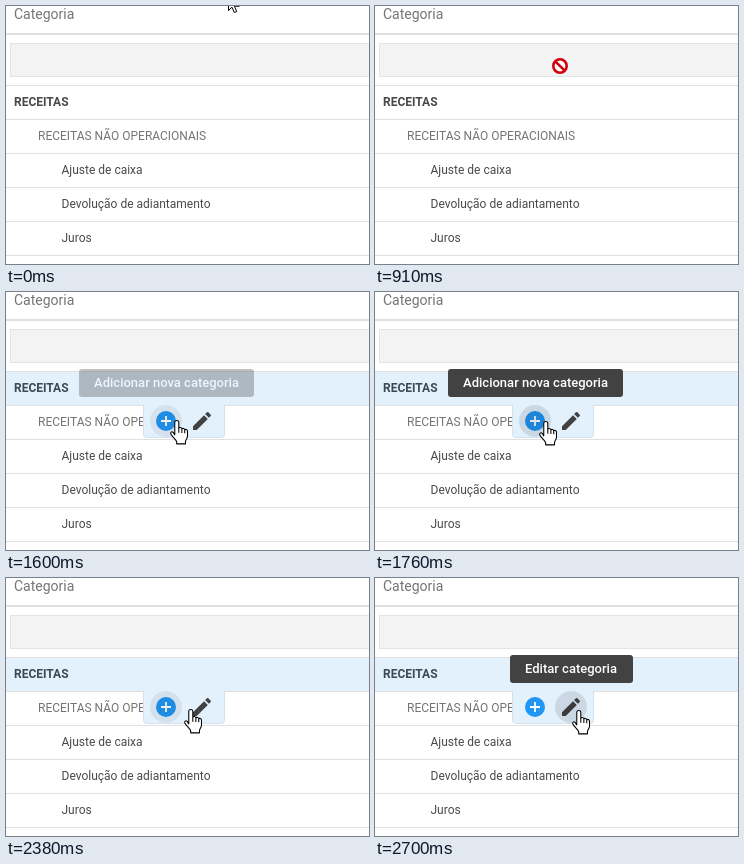
An HTML page for the animation above (4.17 s loop, 363 by 258 pixels).

```html
<!DOCTYPE html>
<html lang="pt">
<head>
<meta charset="utf-8">
<title>Categorias</title>
<style>
  html, body { margin: 0; width: 100%; height: 100%; overflow: hidden; background: #fff; }
  svg { display: block; width: 363px; height: 258px; }
  text { font: 400 12px Roboto, sans-serif; fill: #4a4a4a; white-space: pre; }
  .muted { fill: #757575; }
  .head { font-size: 14px; fill: #757575; }
  .group { font-weight: 700; }
  .tip text { font-size: 13px; font-weight: 500; fill: #fff; }
  .tip rect { fill: #424242; }
</style>
</head>
<body>
<svg viewBox="0 0 363 258">
  <rect width="363" height="258" fill="#fff"/>
  <text class="head" x="8" y="13">Categoria</text>
  <rect y="27" width="363" height="2" fill="#e0e0e0"/>
  <rect x="4.5" y="37.5" width="370" height="33" fill="#f3f3f3" stroke="#e4e4e4"/>
  <rect id="row" y="80" width="363" height="33" fill="#e3f1fd"/>
  <g id="lines" fill="#e0e0e0"></g>
  <text id="group" class="group" x="8" y="100">RECEITAS</text>
  <text class="muted" x="32" y="134">RECEITAS NÃO OPERACIONAIS</text>
  <text x="55.5" y="168">Ajuste de caixa</text>
  <text x="55.5" y="202">Devolução de adiantamento</text>
  <text x="55.5" y="236">Juros</text>

  <g id="menu">
    <path d="M137.5 113V142.5a3 3 0 0 0 3 3H215.5a3 3 0 0 0 3-3V113" fill="#e3f1fd" stroke="#d3e2ef"/>
    <circle cx="160" cy="129" r="10" fill="#2196f3"/>
    <path d="M155 129H165M160 124V134" stroke="#fff" stroke-width="1.8"/>
    <path transform="translate(184 117)" fill="#424242"
      d="M3 17.25V21h3.75L17.8 9.94l-3.75-3.75zM20.7 7.04a1 1 0 0 0 0-1.41l-2.34-2.34a1 1 0 0 0-1.41 0l-1.83 1.83 3.75 3.75z"/>
    <circle id="addHalo" cx="160" cy="129" r="16"/>
    <circle id="editHalo" cx="196" cy="129" r="16"/>
  </g>

  <g id="addTip" class="tip">
    <rect x="73" y="77" width="175" height="28" rx="3"/>
    <text x="88" y="95">Adicionar nova categoria</text>
  </g>
  <g id="editTip" class="tip">
    <rect x="135" y="77" width="123" height="28" rx="3"/>
    <text x="150" y="95">Editar categoria</text>
  </g>

  <g id="cursor">
    <path id="arrow" d="M.5 .5V16.5L4 13.2 6.3 18.5 8.7 17.5 6.4 12.2H11.5Z" fill="#fff" stroke="#000"/>
    <g id="denied" fill="none" stroke="#d0000c" stroke-width="2.6">
      <circle r="6.7" fill="#fff"/>
      <path d="M-4.7 -4.7L4.7 4.7"/>
    </g>
    <path id="hand" transform="translate(-7 0) scale(1.06)" fill="#fff" stroke="#000" stroke-linejoin="round"
      d="M4.5 14V2.4a1.9 1.9 0 0 1 3.8 0V8c.2-1.3 2.9-1.2 2.9.6.3-1.1 2.7-.9 2.7.8.4-.9 2.6-.6 2.6 1.2V15c0 2.5-1.9 3.6-1.9 5.500v2H6.3v-2C5.5 18 2.5 16.5.8 13.2c-.8-1.6 1-2.7 2.2-1.500zM8.3 8v4M11.2 8.6v3.7M13.9 9.4v3.2"/>
  </g>
</svg>
<script>
const LOOP = 4170, START = 600, STEP = 76.8;
// Pointer path: time, x, y
const PATH = [[520, 222, -12], [910, 185, 61], [1220, 177, 79], [1370, 174, 105],
  [1600, 171, 128], [2060, 170, 131], [2190, 170, 131], [2600, 204, 132]];

const $ = id => document.getElementById(id);
const ramp = (t, a, b) => Math.min(1, Math.max(0, (t - a) / (b - a)));
const fade = (id, v) => $(id).setAttribute('opacity', v);
const show = (id, on) => $(id).setAttribute('visibility', on ? 'visible' : 'hidden');

for (let y = 79; y < 258; y += 34) {
  $('lines').innerHTML += `<rect y="${y}" width="363" height="1"/>`;
}

// Sum of all legs, each advanced as far as its own time span allows.
function pointer(t) {
  let [, x, y] = PATH[0];
  for (let i = 1; i < PATH.length; i++) {
    const [t0, x0, y0] = PATH[i - 1], [t1, x1, y1] = PATH[i];
    const p = ramp(t, t0, t1);
    x += (x1 - x0) * p;
    y += (y1 - y0) * p;
  }
  return [Math.round(x), Math.round(y)];
}

// The screen refreshes in fixed steps once the pointer starts moving.
const tick = now => now < START ? 0 : START + Math.floor((now - START) / STEP) * STEP;

function draw(now) {
  const t = tick(now);
  const [x, y] = pointer(t);
  $('cursor').setAttribute('transform', `translate(${x} ${y})`);
  show('arrow', y < 28);
  show('denied', y >= 28 && y < 80);
  show('hand', y >= 80);

  const hover = t >= 1360;
  show('menu', hover);
  $('group').style.fill = hover ? '#3d4a56' : '';
  fade('row', ramp(t, 1310, 1530));
  fade('addHalo', 0.1 * ramp(t, 1480, 1680) * (1 - ramp(t, 2310, 2460)));
  fade('editHalo', 0.1 * ramp(t, 2420, 2620));
  fade('addTip', ramp(t, 1550, 1700) * (1 - ramp(t, 2200, 2360)));
  fade('editTip', ramp(t, 2480, 2640));
}

function loop() {
  draw(performance.now() % LOOP);
  requestAnimationFrame(loop);
}
loop();
</script>
</body>
</html>
```
